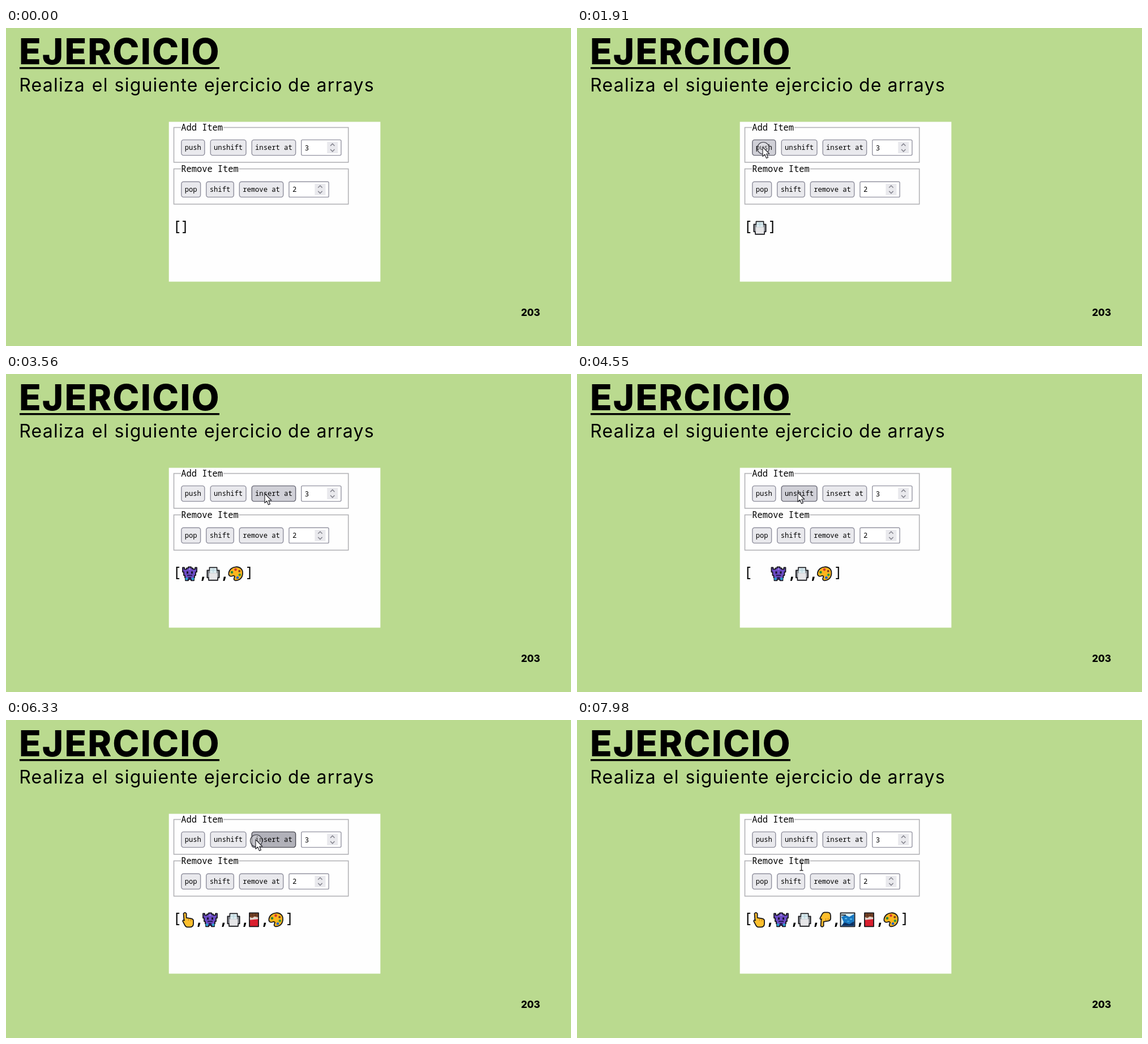
These frames come from a looping animation (998x561 px, 8000 ms). An HTML page:

```html
<!DOCTYPE html>
<html lang="es">
<head>
<meta charset="utf-8">
<title>Ejercicio</title>
<style>
  html, body { margin: 0; width: 100%; height: 100%; overflow: hidden; background: #bada8f; }
  svg { display: block; width: 998px; height: 561px; }
  .sans { font-family: Inter, "Open Sans", sans-serif; }
  .mono { font-family: "Noto Sans Mono", "DejaVu Sans Mono", monospace; }
  .legend { font-size: 15.37px; font-weight: 500; }
  .label { font-size: 12.17px; font-weight: 500; }
  .array { font-size: 25px; font-weight: 600; text-anchor: middle; }
  .bracket { font-size: 24.5px; font-weight: 400; }
  .btn { fill: #e9e9ed; stroke: #8f8f9d; stroke-width: 1.4; }
  .btn.hover { fill: #d0d0d7; stroke: #676774; }
  .btn.active { fill: #b1b1b9; stroke: #484851; }
  .ink { stroke: #16161a; stroke-width: 1.8; stroke-linejoin: round; stroke-linecap: round; }
</style>
</head>
<body>
<svg id="stage" viewBox="0 0 998 561" xmlns="http://www.w3.org/2000/svg">
  <defs>
    <clipPath id="clip"><rect x="288" y="165.5" width="373" height="282"/></clipPath>
  </defs>
  <rect width="998" height="561" fill="#bada8f"/>
  <g class="sans">
    <text x="23" y="63.5" font-size="63.5" font-weight="800" letter-spacing="2.1">EJERCICIO</text>
    <rect x="24" y="69" width="353" height="3.4"/>
    <text id="subtitle" y="111.5" font-size="32" letter-spacing="1.2"></text>
    <text x="909.7" y="508.3" font-size="17" font-weight="800">203</text>
  </g>
  <rect x="287.7" y="165.5" width="373.6" height="282" fill="#fefefe"/>
  <g id="form" class="mono"></g>
  <g id="array" class="mono array" clip-path="url(#clip)">
    <text class="bracket" x="302" y="358">[</text>
    <text class="bracket" id="close" y="358">]</text>
  </g>
  <circle id="ring" r="10.5" fill="#fff" fill-opacity=".25" stroke="#3c3c44" stroke-width="1.2"/>
  <path id="arrow" d="M0 0V16.5L3.8 13L6.4 19.6L9.4 18.4L6.7 12H11.8Z" fill="#fff" stroke="#2a2a30" stroke-width="1.2" stroke-linejoin="round"/>
  <path id="beam" d="M-3 -6.5H-1Q0 -6.5 0 -5.5Q0 -6.5 1 -6.5H3M0 -5.5V6M-3 7H-1Q0 7 0 6Q0 7 1 7H3" fill="none" stroke="#222" stroke-width="1.3"/>
</svg>
<script>
const LOOP = 8000;
const $ = id => document.getElementById(id);
const clamp = v => Math.max(0, Math.min(1, v));
const show = (el, on) => el.setAttribute('visibility', on ? 'visible' : 'hidden');
const moveTo = (el, x, y) => el.setAttribute('transform', `translate(${x.toFixed(2)} ${y.toFixed(2)})`);
const rect = (x, y, w, h, fill) => `<rect x="${x}" y="${y}" width="${w}" height="${h}" fill="${fill}"/>`;
const dot = (x, y, r, fill) => `<circle cx="${x}" cy="${y}" r="${r}" fill="${fill}"/>`;

// Static slide and form
$('subtitle').innerHTML = [['Realiza', 23.3], ['el', 151.8], ['siguiente', 191.6], ['ejercicio', 350], ['de', 498], ['arrays', 548.6]]
  .map(([word, x]) => `<tspan x="${x}">${word}</tspan>`).join(' ');

function fieldset(title, y, h) {
  return `<rect x="296.5" y="${y}" width="308.2" height="${h}" fill="none" stroke="#b2b2b6" stroke-width="1.6"/>`
    + rect(309, y - 4, title.length * 9.22 + 1, 8, '#fefefe')
    + `<text class="legend" x="309.3" y="${y + 5.6}">${title}</text>`;
}

function button(name, x, y, w) {
  return `<rect class="btn" data-name="${name}" x="${x}" y="${y}" width="${w}" height="27.2" rx="3.8"/>`
    + `<text class="label" x="${x + w / 2}" y="${y + 18}" text-anchor="middle">${name}</text>`;
}

function numberBox(value, x, y) {
  const c = x + 55;
  return `<rect x="${x}" y="${y}" width="70.2" height="27.2" rx="2" fill="#fff" stroke="#9595a2" stroke-width="1.4"/>`
    + rect(c - 9.5, y + 3.6, 19, 20, '#e9e9ed')
    + `<path d="M${c - 3.7} ${y + 10.6}l3.7 -3.8l3.7 3.8M${c - 3.7} ${y + 16.6}l3.7 3.8l3.7 -3.8" fill="none" stroke="#85858f" stroke-width="1.5"/>`
    + `<text class="label" x="${x + 6}" y="${y + 18.2}">${value}</text>`;
}

$('form').innerHTML = fieldset('Add Item', 175.5, 61.4) + fieldset('Remove Item', 248.5, 62.2)
  + button('push', 309.8, 197.4, 41) + button('unshift', 361.2, 197.4, 62.8)
  + button('insert at', 434.2, 197.4, 77.4) + numberBox(3, 521.7, 197.4)
  + button('pop', 309.8, 271.2, 33.8) + button('shift', 353.7, 271.2, 48.6)
  + button('remove at', 412.3, 271.2, 77.4) + numberBox(2, 499.9, 271.2);

// Item pictures, drawn from a top left corner at 0,0
const hand = `<path class="ink" fill="#fdbf2d" d="M2.5 3.2Q5 -.2 7.6 3.2V10.5L16.5 12Q20 12.8 20 16V21Q20 27 14.5 27H9.5Q6.5 27 4.8 23.5L1.2 16.5Q1.6 13.8 4.2 15.2L3.4 14Z"/>
  <path d="M11.5 12V16M15.6 12.8V16.6" stroke="#c98310" stroke-width="1.2"/>`;

const art = {
  up: hand,
  down: `<g transform="translate(0 28) scale(1 -1)">${hand}</g>`,
  monster: `<path class="ink" fill="#6c4cc4" d="M1 3H4V6H8V4H11V2H16V4H19V6H23V3H26V11H24V17H22V21H21V26H16V24H11V26H6V21H5V17H3V11H1Z"/>`
    + rect(8, 10, 3, 4, '#17122e') + rect(16, 10, 3, 4, '#17122e')
    + rect(12, 5, 3, 2, '#a98bee') + rect(9, 16, 9, 2, '#241a4d')
    + rect(6, 21, 4, 4, '#27a3cf') + rect(17, 21, 4, 4, '#27a3cf') + rect(11, 20, 5, 3, '#241a4d'),
  printer: `<path class="ink" fill="#8b8e94" d="M5.5 3H18.5V8H22.6V21H20V25.5H4V21H1.4V8H5.5Z"/>`
    + rect(6.2, 4, 11.6, 9, '#dcebef') + rect(6.2, 7.4, 11.6, 1, '#aecbd4') + rect(11.5, 4, 1, 8, '#aecbd4')
    + rect(4.8, 13, 14.4, 11.5, '#e6e6e8'),
  picture: `<path class="ink" fill="#d8eef7" d="M1.5 2H26.5V26H1.5Z"/>`
    + `<path fill="#1878c2" d="M3 9L10 6L17 9L25.6 4V25H4L7 18Z"/><path fill="#0d3264" d="M2.5 25L9 19L17 22L25.5 17V25Z"/>`
    + rect(9, 11, 4, 2, '#62c0ec') + rect(18, 12, 4, 2, '#62c0ec') + rect(13, 16, 4, 2, '#3ba3dd') + rect(3, 5, 8, 1.6, '#16161a'),
  chocolate: `<path class="ink" fill="#7b4528" d="M2 2H18V14H2Z"/><path class="ink" fill="#d91f2e" d="M2 13L18 11V26H2Z"/>`
    + `<path fill="#e3d4cc" d="M2.8 9.5L7 11L11 8.5L17.2 10V13L2.8 14.5Z"/><path d="M7.3 3V8M12.6 3V8M3 6H17" stroke="#55301b"/>`,
  palette: `<path class="ink" fill="#fbb51d" d="M14 2C22 1.5 26.6 7 26 14C25.5 22 20 26.3 13 26C10 25.8 10.2 22.5 11.5 20.5C12.8 18 10.5 17 7.5 18.2C3 19.6 .6 16.6 1.4 12.5C2.7 6 8 2.3 14 2Z"/>`
    + dot(7, 11.5, 2.3, '#27863b') + dot(13.5, 6.8, 2.3, '#d6362f') + dot(20.2, 9.5, 2, '#7d3b25')
    + dot(20.8, 16, 2.2, '#2f9a42') + dot(17, 21, 2.3, '#1b62c9')
};

// Each call: art, advance width, time, index in the array, height of the drop below
const inserts = [
  ['printer', 38, 1440, 0, 110],
  ['palette', 42, 2110, 1, 110],
  ['monster', 43, 3030, 0, 42],
  ['up', 36, 4420, 0, 0],
  ['chocolate', 35, 5340, 3, 95],
  ['picture', 42, 6530, 3, 63],
  ['down', 36, 7590, 3, 20]
].map(([name, step, at, index, drop]) => {
  const el = document.createElementNS('http://www.w3.org/2000/svg', 'g');
  el.innerHTML = art[name] + `<text x="${step - 6}" y="23">,</text>`;
  $('array').append(el);
  return { el, comma: el.lastChild, step, at, index, drop };
});

// Press: ring on, button darkens, release
const presses = [
  [1180, 1250, 1440], [1910, 1980, 2110], [2830, 2830, 3030], [4220, 4220, 4420],
  [5150, 5150, 5340], [6330, 6330, 6530], [7250, 7380, 7590]
];

// Pointer path: time, x, y
const path = [
  [390, 328, 210], [2370, 328, 210], [2630, 390, 210], [3300, 390, 210], [3500, 457, 211],
  [3600, 457, 211], [3820, 416, 211], [4020, 390, 209], [4750, 390, 209], [5000, 441, 211],
  [7720, 441, 211], [7980, 396, 258]
];

function pointerAt(t) {
  const i = path.findIndex(key => key[0] > t);
  if (i < 0) return path[path.length - 1].slice(1);
  const [t0, x0, y0] = path[Math.max(0, i - 1)], [t1, x1, y1] = path[i];
  const u = clamp((t - t0) / (t1 - t0 || 1)), e = u * u * (3 - 2 * u);
  return [x0 + (x1 - x0) * e, y0 + (y1 - y0) * e];
}

function drawArray(t) {
  const list = [];
  for (const item of inserts) {
    if (t >= item.at) list.splice(item.index, 0, item);
    else { show(item.el, false); show(item.comma, false); }
  }
  let x = 311;
  list.forEach((item, i) => {
    const age = t - item.at;
    const grow = 1 - (1 - clamp((age + 67) / 315)) ** 2;
    const fall = clamp((age - 155) / 130);
    const visible = age > 145;
    moveTo(item.el, x, 338.3 + item.drop * (1 - fall) ** 2);
    show(item.el, visible);
    show(item.comma, visible && i < list.length - 1);
    x += item.step * grow;
  });
  $('close').setAttribute('x', Math.max(316, x - 4));
}

const buttons = [...document.querySelectorAll('.btn')];

function drawPointer(t) {
  const on = t >= path[0][0];
  const [x, y] = pointerAt(t);
  const press = presses.find(p => t >= p[0] && t < p[2]);
  const overText = y > 240;
  for (const b of buttons) {
    const { x: bx, y: by, width: w, height: h } = b.getBBox();
    const over = on && x >= bx && x <= bx + w && y >= by && y <= by + h;
    const down = over && press && t >= press[1];
    b.setAttribute('class', 'btn' + (down ? ' active' : over ? ' hover' : ''));
  }
  show($('arrow'), on && !overText);
  show($('beam'), on && overText);
  show($('ring'), !!press);
  moveTo($('arrow'), x, y);
  moveTo($('beam'), x + .5, y + .5);
  moveTo($('ring'), x + 1, y + 2);
}

// Poses are held for 66 ms, like a screen capture at 15 pictures a second
const hold = t => Math.floor((t - 384) / 66) * 66 + 398;

function render(now) {
  const t = hold(now % LOOP);
  drawArray(t);
  drawPointer(t);
}

function tick() {
  render(performance.now());
  requestAnimationFrame(tick);
}
tick();
</script>
</body>
</html>
```
